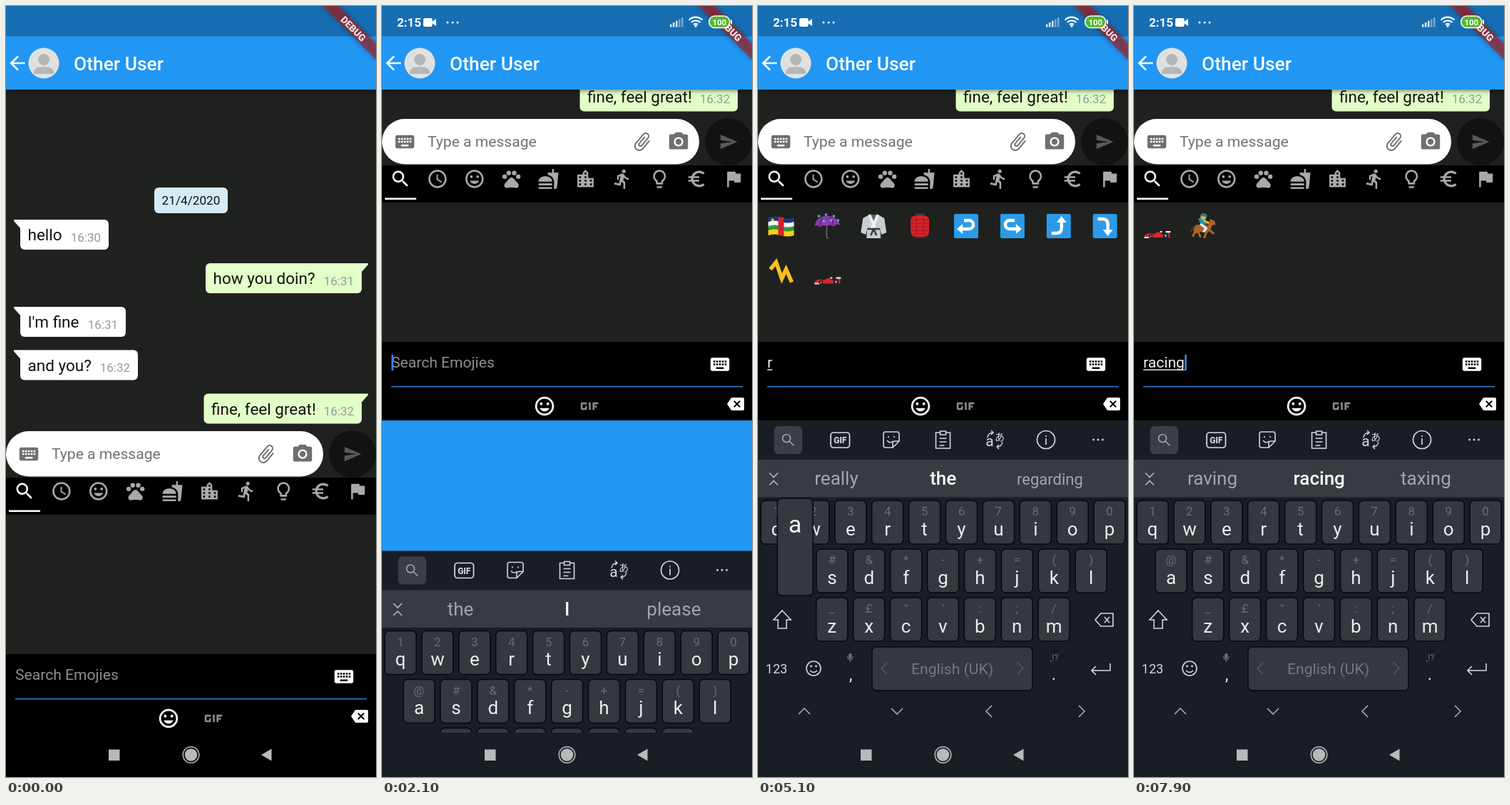
Animation of 519x1079 px, one loop 8000 ms. Source, as an HTML page with a canvas:

```html
<!DOCTYPE html>
<html lang="en">
<head>
<meta charset="utf-8">
<title>Emoji search</title>
<style>
html, body { margin: 0; width: 100%; height: 100%; overflow: hidden; background: #000; }
canvas { display: block; width: 519px; height: 1079px; }
</style>
</head>
<body>
<canvas id="stage" width="519" height="1079"></canvas>
<script>
const ctx = document.getElementById('stage').getContext('2d');
const LOOP = 8000, SHIFT = 437, STEP = 51.9;
const DARK = '#1f211f', BLUE = '#2196f3', KEY = '#35383e', BOARD = '#191e25';

// Icons on a 24 unit grid
const disc = (x, y, r) => `M${x - r} ${y}a${r} ${r} 0 1 0 ${2 * r} 0a${r} ${r} 0 1 0 ${-2 * r} 0z`;
const ring = disc(12, 12, 10) + disc(12, 12, 8);
const square = (x, y) => `M${x} ${y}h2v2h-2z`;
const ICONS = {
  search: 'M15.5 14h-.79l-.28-.27A6.47 6.47 0 0 0 16 9.5 6.5 6.5 0 1 0 9.5 16c1.61 0 3.09-.59 4.23-1.57l.27.28v.79l5 4.99L20.49 19z' + disc(9.5, 9.5, 4.5),
  clock: ring + 'M12.5 7H11v6l5.25 3.15.75-1.23-4.5-2.67z',
  smile: ring + disc(15.5, 9.5, 1.5) + disc(8.5, 9.5, 1.5) + 'M12 17.5c2.33 0 4.31-1.46 5.11-3.5H6.89c.8 2.04 2.78 3.5 5.11 3.5z',
  paw: disc(4.5, 9.5, 2.5) + disc(9, 5.5, 2.5) + disc(15, 5.5, 2.5) + disc(19.5, 9.5, 2.5) +
    'M17.3 14.9L14.9 12q-2.9-3-5.8 0L6.7 14.9C5.4 16.200 3.700 17.600 4 19.600c.3 1 1 2 2.300 2.300.8.2 3.100-.4 5.700-.4s4.900.6 5.700.4c1.300-.3 2-1.300 2.300-2.300.3-2-1.400-3.400-2.700-4.700z',
  food: 'M18.06 23h1.66c.84 0 1.53-.64 1.63-1.46L23 5.05h-5V1h-1.97v4.05h-4.97l.3 2.34c1.71.47 3.31 1.32 4.27 2.26 1.44 1.42 2.43 2.89 2.43 5.29zM1 22v-1h15v1q0 1-1 1H2q-1 0-1-1zM16 15C16 7 1 7 1 15zM1 17h15v2H1z',
  city: 'M15 11V5l-3-3-3 3v2H3v14h18V11z' + [9, 13, 17].map(y => square(5, y)).join('') +
    [5, 9, 13, 17].map(y => square(11, y)).join('') + square(17, 13) + square(17, 17),
  run: disc(13.5, 3.5, 2) + 'M9.9 19.400l1-4.400 2.100 2v6h2v-7.500l-2.100-2 .6-3c1.300 1.500 3.300 2.500 5.500 2.500v-2c-1.900 0-3.500-1-4.300-2.400l-1-1.600c-.4-.6-1-1-1.700-1-.3 0-.5.1-.8.1L6 8.300V13h2V9.600l1.800-.7L8.200 17l-4.900-1-.4 2z',
  bulb: 'M9 21q0 1 1 1h4q1 0 1-1v-1H9zM12 2C8.140 2 5 5.140 5 9c0 2.380 1.190 4.470 3 5.740V17q0 1 1 1h6q1 0 1-1v-2.260c1.810-1.270 3-3.360 3-5.740 0-3.860-3.140-7-7-7zM14.850 13.100l-.85.6V16h-4v-2.300l-.85-.6C7.800 12.160 7 10.630 7 9a5 5 0 0 1 10 0c0 1.630-.8 3.160-2.150 4.100z',
  euro: 'M15 18.5c-2.510 0-4.680-1.420-5.760-3.500H15v-2H8.580q-.16-1 0-2H15V9H9.240C10.320 6.920 12.500 5.500 15 5.500c1.610 0 3.090.59 4.230 1.570L21 5.300C19.410 3.870 17.300 3 15 3 11.080 3 7.760 5.510 6.520 9H3v2h3.060q-.12 1 0 2H3v2h3.520c1.240 3.490 4.560 6 8.480 6 2.310 0 4.410-.87 6-2.300l-1.780-1.770A6.400 6.400 0 0 1 15 18.500z',
  flag: 'M14.4 6L14 4H5v17h2v-7h5.6l.4 2h7V6z',
  keyboard: 'M20 5H4Q2 5 2 7V17q0 2 2 2h16q2 0 2-2V7q0-2-2-2zM8 15h8v2H8z' +
    [5, 8, 11, 14, 17].map(x => square(x, 8) + square(x, 11)).join(''),
  clip: 'M16.5 6v11.5a4 4 0 0 1-8 0V5a2.5 2.5 0 0 1 5 0v10.5a1 1 0 0 1-2 0V6H10v9.500a2.500 2.500 0 0 0 5 0V5a4 4 0 0 0-8 0v12.500a5.500 5.500 0 0 0 11 0V6z',
  camera: 'M9 2L7.170 4H4Q2 4 2 6v12q0 2 2 2h16q2 0 2-2V6q0-2-2-2h-3.170L15 2z' + disc(12, 12, 5) + disc(12, 12, 3.2),
  send: 'M2 21L23 12 2 3V10l15 2-15 2z',
  back: 'M20 11H7.830l5.590-5.590L12 4l-8 8 8 8 1.410-1.410L7.830 13H20z',
  erase: 'M22 3H7q-1 0-1.600.9L0 12l5.400 8.100Q6 21 7 21h15q2 0 2-2V5q0-2-2-2zM19 15.600L17.600 17 14 13.400 10.400 17 9 15.600 12.600 12 9 8.400 10.400 7 14 10.600 17.600 7 19 8.400 15.400 12z',
  gif: 'M11.500 9H13v6h-1.500zM9 9H6Q5 9 5 10v4q0 1 1 1h3q1 0 1-1v-2H8.500v1.500h-2v-3H10V10q0-1-1-1zM19 10.500V9h-4.500v6H16v-2h2v-1.500h-2v-1z'
};
const TABS = ['search', 'clock', 'smile', 'paw', 'food', 'city', 'run', 'bulb', 'euro', 'flag'];

// Emoji as layers: [path, fill, stroke, stroke width], centred on 0,0
const tile = 'M-15-17h30q2 0 2 2v30q0 2-2 2h-30q-2 0-2-2v-30q0-2 2-2z';
const arrowTile = (stem, head) => [[tile, '#2b9be8'], [stem, 0, '#fff', 4.5], [head, '#fff']];
const band = (y, c) => [`M-18 ${y}q9-3 18 0t18 0v7q-9 3-18 0t-18 0z`, c];
const EMOJI = {
  flag: [band(-12, '#17358c'), band(-6, '#f3f3f3'), band(0, '#2f9a3e'), band(6, '#fbd116'),
    ['M-4-13l8 1v26l-8-1z', '#d5202c'], [disc(-12, -8.500, 2), '#fbd116']],
  umbrella: [['M-1 1L-1 14q0 3 3 3', 0, '#555d63', 2], ['M-18 0C-15-19 13-19 18-1Q13-5 9 1Q4-4-1 1Q-6-4-10 2Q-14-3-18 0z', '#8a3aa8'],
    ['M-7-11Q-11-6-10 0M3-13Q9-7 8 0', 0, '#5e2580', 1.5], [[[-12, -14], [-2, -16], [9, -14], [15, -8], [-5, -7], [5, -8]].map(p => disc(...p, 1.7)).join(''), '#58b8f0']],
  gi: [['M-6-16H6l9 5 3 20-7 3-2-8 1 13H-10l1-13-2 8-7-3 3-20z', '#c8cdd0'], ['M-6-16L2 2M6-16L-3 4', 0, '#eef1f2', 4], ['M-4-16H4L0-7z', '#59646a'],
    ['M-9 4H9M0 4l-4 9M0 4l4 9', 0, '#30383c', 2.5]],
  lantern: [['M-6-18H6V17H-6z', '#3b3030'], ['M-6-15H6Q13-14 13-7V7Q13 14 6 15H-6Q-13 14-13 7V-7Q-13-14-6-15z', '#d8232a'],
    ['M-12-9H12M-13-4H13M-13 1H13M-13 6H13M-11 11H11M-5-15V15M5-15V15', 0, '#a5161d', 1]],
  left: arrowTile('M-3-8H4a6 6 0 0 1 0 12H-6', 'M-13 4l8-7v14z'),
  right: arrowTile('M3-8H-4a6 6 0 0 0 0 12H6', 'M13 4l-8-7v14z'),
  up: arrowTile('M-10 10H-3Q4 10 4 2V-6', 'M4-14l7 9h-14z'),
  down: arrowTile('M-10-10H-3Q4-10 4-2V6', 'M4 14l7-9h-14z'),
  mark: [['M-15-4L-7-14L1 9L7-4L15 14', 0, '#fbc11f', 5.500]],
  car: [['M-18 13l6-3 8 1 5-3 6 3 7 1V8h4v8H-17z', '#d9252d'], ['M-18 16H-9M4 8h3', 0, '#e8e8e8', 2], ['M12 7h7v2h-7z', '#fafafa'],
    [disc(-9, 14.500, 3) + disc(12, 13.500, 4), '#25292c'], [disc(-9, 14.500, 1) + disc(12, 13.500, 1.400), '#b7bcbf']],
  raccoon: [['M-16-15Q-9-16-5-11H5Q9-16 16-15Q17-7 14-4L18 5Q10 14 0 15Q-10 14-18 5L-14-4Q-17-7-16-15z', '#8d9296'], ['M-13-12l6 3-5 4zM13-12l-6 3 5 4z', '#3f4448'],
    ['M-18 5Q-12-4 0-2Q12-4 18 5Q10 14 0 15Q-10 14-18 5z', '#eceff0'], ['M-15 4Q-9-6-2-2Q-3 6-10 7zM15 4Q9-6 2-2Q3 6 10 7zM-2-10h4v10h-4z', '#34393d'],
    [disc(-6, 2, 1.500) + disc(6, 2, 1.500), '#fff'], ['M-4 8H4L0 12z', '#202326']],
  cracker: [[disc(0, 0, 17.500), '#d98324'], [disc(0, -1, 14), '#e99a38'], [[[-9, -6], [-2, -10], [6, -8], [10, -1], [-11, 3], [2, -3]].map(p => disc(...p, 1.200)).join(''), '#a65514'],
    ['M-8 1H8V17Q0 19-8 17z', '#33393a']],
  tractor: [['M-2-12H13V-9H11L13 2H0z', '#f0a41c'], ['M1-8H9V0H2z', '#9fd8ef'], ['M-15-1H2L12 3V10H-16z', '#f5b52c'], ['M-9-9V0', 0, '#60676b', 2],
    [disc(9, 7, 9) + disc(-11, 10, 6), '#34393d'], [disc(9, 7, 4.500) + disc(-11, 10, 3), '#f2a51e']],
  track: [['M-18-8H18V17H-18z', '#7cad55'], ['M-18-10H18V-4H-18z', '#8fb7b4'], ['M-6-9H6L17 17H-17z', '#7d746f'],
    ['M-6-4H6M-9 1H9M-11 7H11M-14 13H14', 0, '#4e3c36', 2.500], ['M-5-9L-12 17M5-9L12 17', 0, '#c7cdd0', 2]],
  horse: [['M-14 5Q-14-3-5-2L5-2L10-10L16-7L17-2L12-1L9 7Q4 11-4 8L-12 11z', '#a8652c'], ['M-11 6l-4 9M-7 8l3 8M5 7l-4 10M8 5l7 6', 0, '#a8652c', 3],
    ['M-13 1l-5 7M8-7l-3 6', 0, '#5a3014', 3], ['M-7-11H3L5-3L-4-1z', '#1597a5'], ['M0-8l8 4', 0, '#e7b91f', 3], ['M-4-3L4 3L0 8', 0, '#f1f1f1', 3], [disc(0, -13, 4), '#e0ad78'], ['M-5-14Q-3-20 4-17L6-13z', '#27835b']],
  cracker2: [['M-9-9Q-13-10-13-15', 0, '#c6a469', 2], ['M-14-18l2 2 3-2-1 3 3 2-4 1-1 4-2-4-4 0 3-3z', '#fbc62d'], ['M-11-6L-4-12L16 11L9 17z', '#d9282c'], ['M-8-7L12 15', 0, '#ef5a4c', 2], ['M-11-6L-4-12L-2-9L-9-3zM14 8L16 11L9 17L6 14z', '#9d171d']],
  ball: [['M0-17C10-17 14-6 13 4Q11 17 0 17Q-11 17-13 4C-14-6-10-17 0-17z', '#545d62'], ['M0-16V-9M-12 2Q0 8 12 2', 0, '#30373b', 2], [disc(0, -5, 6), '#d92d35'], [disc(-2, -7, 1.500), '#ff8e8b']],
  shuffle: [[tile, '#f7941f'], ['M-13-7H-8Q-3-7 0 0T8 7M-13 7H-8Q-3 7 0 0T8-7', 0, '#fff', 4], ['M7-13l8 6-8 6zM7 1l8 6-8 6z', '#fff']]
};

// What the search shows from each moment on
const STATES = [
  { at: 0, word: '', hints: ['the', 'I', 'please'], found: '' },
  { at: 4200, word: 'r', hints: ['really', 'the', 'regarding'], found: 'flag umbrella gi lantern left right up down mark car' },
  { at: 5300, word: 'ra', hints: ['rather', 'ra', 'rate'], found: 'raccoon umbrella cracker tractor car track horse cracker2 ball shuffle' },
  { at: 5700, word: 'rac', hints: ['each', 'tax', 'Rachel'], found: 'raccoon cracker tractor car track horse cracker2 ball shuffle' },
  { at: 6500, word: 'raci', hints: ['racing', 'taxi', 'raving'], found: 'car horse' },
  { at: 7100, word: 'racin', hints: ['raving', 'racing', 'taxing'], found: 'car horse' },
  { at: 7500, word: 'racing', hints: ['raving', 'racing', 'taxing'], found: 'car horse' }
];
const PRESSES = [['r', 4000, 4200], ['a', 5100, 5300], ['c', 5500, 5700], ['i', 6350, 6500], ['n', 6900, 7100], ['g', 7400, 7500]];
const ROWS = [
  { keys: 'qwertyuiop', alt: '1234567890', x: 26, y: 692 },
  { keys: 'asdfghjkl', alt: '@#&*-+=()', x: 52, y: 760 },
  { keys: 'zxcvbnm', alt: '_£"\':;/', x: 103.7, y: 828 }
];
const FOCUS = 1700, RISE = 2000;

const clamp = v => Math.max(0, Math.min(1, v));

function rect(x, y, w, h, fill) {
  ctx.fillStyle = fill;
  ctx.fillRect(x, y, w, h);
}

function box(x, y, w, h, r, fill, edge, width = 1) {
  ctx.beginPath();
  ctx.roundRect(x, y, w, h, r);
  if (fill) { ctx.fillStyle = fill; ctx.fill(); }
  if (edge) { ctx.strokeStyle = edge; ctx.lineWidth = width; ctx.stroke(); }
}

function text(s, x, y, size, color, align = 'left', weight = 400) {
  ctx.font = `${weight} ${size}px Roboto, "Noto Sans CJK JP", sans-serif`;
  ctx.textAlign = align;
  ctx.fillStyle = color;
  ctx.fillText(s, x, y);
}

function shape(d, x, y, fill, edge, width) {
  const path = new Path2D(d);
  ctx.save();
  ctx.translate(x, y);
  if (fill) { ctx.fillStyle = fill; ctx.fill(path); }
  if (edge) { ctx.strokeStyle = edge; ctx.lineWidth = width; ctx.stroke(path); }
  ctx.restore();
}

const line = (d, x, y, color = '#d5d7da', width = 1.6) => shape(d, x, y, null, color, width);

function icon(name, x, y, size, color, turn = 0) {
  ctx.save();
  ctx.translate(x, y);
  ctx.rotate(turn);
  ctx.scale(size / 24, size / 24);
  ctx.translate(-12, -12);
  ctx.fillStyle = color;
  ctx.fill(new Path2D(ICONS[name]), 'evenodd');
  ctx.restore();
}

function bubble(s, time, x, right, y, sent) {
  const fill = sent ? '#e1ffc7' : '#fff';
  box(x, y, right - x, 42, sent ? [6, 0, 6, 6] : [0, 6, 6, 6], fill);
  if (sent) shape('M-1 0H8.500Q10 1 8 3L-1 13z', right, y, fill);
  else shape('M1 0H-8.500Q-10 1-8 3L1 13z', x, y, fill);
  text(s, x + 10.500, y + 29, 22.500, '#111');
  text(time, right - 11, y + 30.500, 17, '#999', 'right');
}

function chat() {
  rect(0, 117, 519, 543, DARK);
  box(208, 254, 103, 36, 6, '#d4eaf5');
  text('21/4/2020', 259.500, 278, 17.200, '#111', 'center');
  bubble('hello', '16:30', 20, 144, 299, false);
  bubble('how you doin?', '16:31', 280, 499, 360, true);
  bubble("I'm fine", '16:31', 20, 168, 421, false);
  bubble('and you?', '16:32', 20, 185, 481.500, false);
  bubble('fine, feel great!', '16:32', 277.500, 499, 542.500, true);
  box(0, 595, 445, 63.500, 32, '#fff');
  icon('keyboard', 32, 627, 31.700, '#6f6f6f');
  text('Type a message', 64, 634, 21.100, '#727272');
  icon('clip', 365, 627, 31, '#6f6f6f', Math.PI / 4.500);
  icon('camera', 416, 627, 31.700, '#6f6f6f');
  shape(disc(486, 627, 33), 0, 0, '#111311');
  icon('send', 486, 627, 27, '#585a58');
}

function picker(state, caret) {
  rect(0, 660, 519, 52, '#000');
  TABS.forEach((name, i) => icon(name, 25.950 + STEP * i, 679, 30.500, i ? '#a9a9a9' : '#fff'));
  rect(4, 705.500, 44, 2.500, '#fff');
  rect(0, 712, 519, 195, DARK);
  state.found.split(' ').filter(Boolean).forEach((name, i) => {
    const x = 32.400 + 64.900 * (i % 8), y = 745 + 64.500 * Math.floor(i / 8);
    EMOJI[name].forEach(([d, ...paint]) => shape(d, x, y, ...paint));
  });
  rect(0, 907, 519, 110, '#000');
  if (state.word) text(state.word, 13, 943, 21.100, '#f2f2f2');
  else text('Search Emojies', 13, 943, 21.100, '#8f8f8f');
  const end = state.word ? ctx.measureText(state.word).width : 0;
  rect(13, 945.500, end, 1.400, '#f2f2f2');
  if (caret) rect(13.300 + end, 925, 2.600, 22, '#3f87ea');
  icon('keyboard', 474, 938.500, 31.700, '#fff');
  rect(13, 968.800, 493, 1.800, '#236fc0');
  icon('smile', 228, 997, 31.700, '#fff');
  icon('gif', 291, 997, 42, '#8c8c8c');
  icon('erase', 496, 994, 24, '#fff');
}

function header() {
  ctx.save();
  ctx.shadowColor = 'rgba(0,0,0,.45)';
  ctx.shadowBlur = 6;
  ctx.shadowOffsetY = 2;
  rect(0, 42, 519, 75, BLUE);
  ctx.restore();
  rect(0, 0, 519, 42.500, '#186eb3');
  icon('back', 16, 80, 31.700, '#fff');
  shape(disc(53, 80, 21.500), 0, 0, '#e0e1e1');
  shape(disc(53, 75, 8) + 'M39 95V92Q40 85 53 85T67 92V95z', 0, 0, '#b4b7b8');
  text('Other User', 95, 90, 26.400, '#fff', 'left', 500);
}

function banner() {
  ctx.save();
  ctx.translate(519, 0);
  ctx.rotate(Math.PI / 4);
  ctx.shadowColor = 'rgba(0,0,0,.5)';
  ctx.shadowBlur = 8;
  rect(-53, 37, 106, 16, 'rgba(183,28,28,.63)');
  ctx.shadowBlur = 0;
  text('DEBUG', 0, 49.700, 13.500, '#f2e4e4', 'center', 900);
  ctx.restore();
}

function statusIcons(alpha) {
  ctx.save();
  ctx.globalAlpha = alpha;
  text('2:15', 21, 29, 17, '#fff', 'left', 600);
  box(58, 17, 12.500, 12, 2, '#fff');
  shape('M70 22l6-4v10l-6-4z', 0, 0, '#fff');
  [92, 99, 106].forEach(x => shape(disc(x, 23, 1.500), 0, 0, '#fff'));
  for (let i = 0; i < 5; i++) {
    const h = 4 + 2.400 * i;
    rect(404 + 4 * i, 29.500 - h, 2.500, h, i < 3 ? '#e4eef6' : 'rgba(255,255,255,.4)');
  }
  [13, 8.500, 4].forEach(r => line(`M${-r * .72} ${-r * .72}A${r} ${r} 0 0 1 ${r * .72} ${-r * .72}`, 440, 29, '#fff', 2.300));
  shape(disc(440, 28, 1.800), 0, 0, '#fff');
  box(458.700, 14, 29, 16.500, 8, '#55b82e', '#fff', 1.500);
  rect(489, 19.500, 2, 6, '#fff');
  text('100', 473.300, 26.600, 11.500, '#fff', 'center', 700);
  ctx.restore();
}

function toolbar() {
  box(22.500, 588, 39.500, 39, 6, '#3b3e44');
  line(disc(-2, -2, 5.500) + 'M2 2L8 8', 42, 607, '#a4a7ab');
  box(102, 597, 26.500, 21, 4, null, '#dcdee0', 1.700);
  text('GIF', 115.300, 612, 12, '#e2e4e6', 'center', 700);
  line('M-8-11H8q3 0 3 3V2L2 11H-8q-3 0-3-3V-8q0-3 3-3zM11 2H5q-3 0-3 3v6M-6 1q4 5 8 1M-4-5v2M4-5v2', 187, 607);
  line('M-4-10H-10V12H10V-10H4M-4-12H4V-7H-4zM-5-2H5M-5 3H5M-5 8H2', 259.500, 607);
  text('a', 325, 616, 21, '#dcdee0', 'center');
  text('あ', 339, 608, 14, '#dcdee0', 'center');
  line('M-10-3Q-9-10-2-10M-5-13l3 3-3 3M11 3Q10 10 3 10M6 7l-3 3 3 3', 332, 607, '#d5d7da', 1.400);
  line(disc(0, 0, 12.500) + 'M0-2V7M0-6v2', 404, 607, '#d5d7da', 1.700);
  [470.500, 477, 483.500].forEach(x => shape(disc(x, 607, 1.400), 0, 0, '#d5d7da'));
}

function suggestions(words) {
  rect(0, 635, 519, 52.500, '#383b41');
  line('M-6-8.500L0-2.500L6-8.500M-6 8.500L0 2.500L6 8.500', 22, 662, '#b4b7bb');
  words.forEach((word, i) => {
    const size = word.length > 8 ? 22 : 26;
    text(word, 110 + 149.700 * i, 670, size, i === 1 ? '#fff' : '#a3a6ab', 'center', i === 1 ? 500 : 400);
  });
}

function keyRows(pressed) {
  let popup;
  for (const row of ROWS) {
    [...row.keys].forEach((key, i) => {
      const x = row.x + STEP * i;
      if (key === pressed) { popup = [x, row.y - 71]; return; }
      box(x - 22, row.y, 44, 61, 6, KEY, '#07090c', 1.500);
      text(row.alt[i], x, row.y + 21, 17, '#6a6d73', 'center');
      text(key, x, row.y + 48.500, 26, '#eceded', 'center');
    });
  }
  if (!popup) return;
  const [x, y] = popup;
  box(x - 25, y, 50, 136, 6, KEY, '#07090c', 1.500);
  text(pressed, x, y + 48, 34, '#f2f2f2', 'center');
}

function functionKeys() {
  line('M0-13L12 0H6V12H-6V0H-12z', 34, 859);
  line('M-5-9H12V9H-5L-13 0zM0-4L7 4M7-4L0 4', 486, 859);
  text('123', 26, 934, 18, '#d5d7da', 'center');
  line(disc(0, 0, 10) + 'M-5 3Q0 8 5 3', 78, 927);
  shape(disc(-3.500, -3, 1.400) + disc(3.500, -3, 1.400), 78, 927, '#d5d7da');
  box(127, 906, 4.500, 8, 2.200, '#6a6d73');
  line('M-4-2Q-4 3 0 3T4-2M0 3V6', 129.300, 912, '#6a6d73', 1.200);
  text(',', 130, 944, 24, '#e0e2e4', 'center');
  box(160, 897, 225, 61, 6, KEY, '#07090c', 1.500);
  text('English (UK)', 272.500, 934.500, 21.100, '#74777d', 'center');
  line('M4-8L-4 0L4 8', 177, 927, '#53565c');
  line('M-4-8L4 0L-4 8', 368, 927, '#53565c');
  text(',!?', 415.500, 916, 13, '#6a6d73', 'center');
  text('.', 415, 943, 24, '#e0e2e4', 'center');
  line('M13-8V2H-13M-7-4L-13 2L-7 8', 481, 928);
  line('M-8 4L0-4L8 4', 65, 987, '#b9bcc0', 1.400);
  line('M-8-4L0 4L8-4', 195, 987, '#b9bcc0', 1.400);
  line('M4-8L-4 0L4 8', 324, 987, '#b9bcc0', 1.400);
  line('M-4-8L4 0L-4 8', 454, 987, '#b9bcc0', 1.400);
}

function keyboard(rise, words, pressed) {
  ctx.save();
  ctx.beginPath();
  ctx.rect(0, 580, 519, 437);
  ctx.clip();
  ctx.translate(0, SHIFT * (1 - rise));
  rect(0, 580, 519, 440, BOARD);
  toolbar();
  suggestions(words);
  keyRows(pressed);
  functionKeys();
  ctx.restore();
}

function navigation(color) {
  rect(0, 1017, 519, 62, color);
  rect(144, 1040.500, 15.500, 15.500, '#b9b9b9');
  line(disc(259.500, 1048, 11.300), 0, 0, '#b9b9b9', 1.500);
  shape(disc(259.500, 1048, 8.800), 0, 0, '#b9b9b9');
  shape('M358 1048L372.500 1039.500V1056.500z', 0, 0, '#b9b9b9');
}

function caretOn(t, state) {
  if (t < FOCUS) return false;
  if (state.word) return (t - state.at) % 1000 < 500;
  return t < 2700 || (t >= 3200 && t < 3700);
}

function draw(t) {
  const state = STATES.findLast(s => t >= s.at);
  const press = PRESSES.find(p => t >= p[1] && t < p[2]);
  const rise = 1 - (1 - clamp((t - RISE) / 400)) ** 3;

  rect(0, 0, 519, 1079, BLUE);
  ctx.save();
  ctx.beginPath();
  ctx.rect(0, 117, 519, 900);
  ctx.clip();
  if (t >= FOCUS) ctx.translate(0, -SHIFT);
  chat();
  picker(state, caretOn(t, state));
  ctx.restore();

  header();
  if (rise > 0) keyboard(rise, state.hints, press && press[0]);
  navigation(rise > 0 ? BOARD : '#000');
  banner();
  statusIcons(clamp((t - 300) / 300));
}

function tick() {
  draw(performance.now() % LOOP);
  requestAnimationFrame(tick);
}
tick();
</script>
</body>
</html>
```
